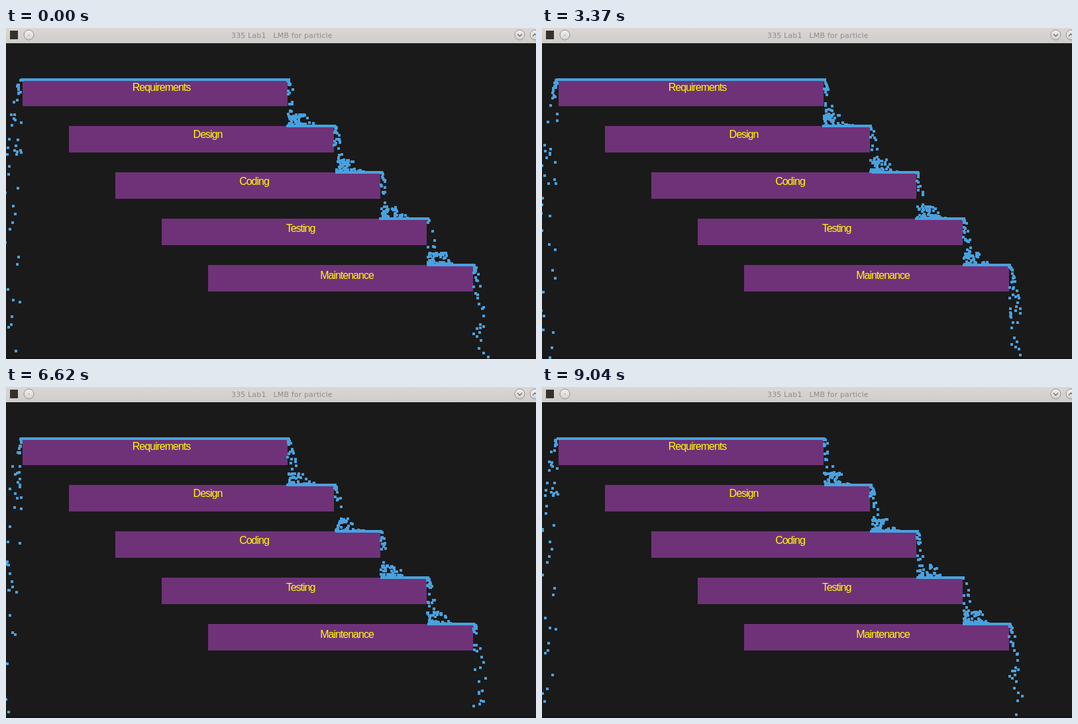
Animation of 800 by 500 pixels, one loop 9.14 s. Source, as an HTML page with a canvas:

```html
<!DOCTYPE html>
<html lang="en">
<head>
<meta charset="utf-8">
<title>Waterfall particles</title>
<style>
  html, body { margin: 0; width: 100%; height: 100%; overflow: hidden; background: #1a1a1a; }
  svg, canvas { position: absolute; left: 0; top: 0; width: 800px; height: 500px; }
  .title { font: 11px "DejaVu Sans", sans-serif; letter-spacing: .15px; fill: #8e8c8a; white-space: pre; }
  .label { font: 16px "Liberation Sans", Arial, sans-serif; letter-spacing: -1px; fill: #ff0; text-anchor: middle; }
  .box { fill: #6f3278; }
  .button { fill: url(#knob); stroke: #8f8d8a; }
  .arrow { fill: none; stroke: #6c6a68; stroke-width: 1.3; }
</style>
</head>
<body>
<svg viewBox="0 0 800 500">
  <defs>
    <linearGradient id="bar" x2="0" y2="1">
      <stop offset="0" stop-color="#dad7d5"/>
      <stop offset="1" stop-color="#cfccc9"/>
    </linearGradient>
    <linearGradient id="knob" x2="0" y2="1">
      <stop offset="0" stop-color="#f4f3f2"/>
      <stop offset="1" stop-color="#d3d0ce"/>
    </linearGradient>
  </defs>
  <rect width="800" height="500" fill="#1a1a1a"/>
  <rect y="497" width="800" height="3" fill="#161616"/>
  <rect width="800" height="23" fill="url(#bar)"/>
  <rect x="6" y="4" width="12" height="13" fill="#35322b"/>
  <circle class="button" cx="34.5" cy="10.5" r="7.5"/>
  <circle cx="34.5" cy="10.5" r="1" fill="#aaa8a6"/>
  <circle class="button" cx="775.5" cy="10.5" r="7.5"/>
  <path class="arrow" d="M772 9l3.5 3.5L779 9"/>
  <circle class="button" cx="798.5" cy="10.5" r="7.5"/>
  <path class="arrow" d="M795 12.5l3.5-3.5L802 12.5"/>
  <text class="title" x="340" y="15">335 Lab1&#160;&#160;&#160;LMB for particle</text>
  <g id="steps"></g>
</svg>
<canvas id="water" width="800" height="500"></canvas>
<script>
const LOOP = 9140, STEP = 53.5, FRAMES = 170;
const GRAVITY = 0.9, DROP = 70, MAX_SPEED = 1.36, PER_EDGE = 340;
const LABELS = ["Requirements", "Design", "Coding", "Testing", "Maintenance"];
const ctx = document.getElementById("water").getContext("2d");

const boxes = LABELS.map((text, i) => ({ text, x: 25 + 70 * i, y: 78 + 70 * i, w: 400, h: 40 }));

document.getElementById("steps").innerHTML = boxes.map((b, i) =>
  `<rect class="box" x="${b.x}" y="${b.y}" width="${b.w}" height="${b.h}"/>` +
  `<text class="label" x="${b.x + 209.5}" y="${95 + 71 * i}">${b.text}</text>`).join("");

let seed = 335;
function random() {
  seed = (seed * 1664525 + 1013904223) % 4294967296;
  return seed / 4294967296;
}

// Each edge sheds particles at random moments of the loop.
function makeEdge(x, y, dir, lands) {
  const drops = Array.from({ length: PER_EDGE }, () => ({
    born: random() * FRAMES,
    speed: dir * (0.02 + random() * MAX_SPEED),
    start: x + dir * random() * 1.4,
    bounce: 0.48 + random() * 0.04
  }));
  return { y, lands, drops };
}

const edges = [makeEdge(24, 78, -1, false)].concat(
  boxes.map((b, i) => makeEdge(b.x + b.w, b.y, 1, i < boxes.length - 1)));

const starts = Array.from({ length: FRAMES * boxes.length }, () => Math.floor(random() * 6) - 2);

// Distance fallen at a given age; null once the particle has settled.
function fallen(age, bounce, lands) {
  const d = GRAVITY * age * age / 2;
  if (!lands || d < DROP) return d;
  let v = Math.sqrt(2 * GRAVITY * DROP);
  age -= v / GRAVITY;
  for (let n = 0; n < 3; n++) {
    v *= bounce;
    const flight = 2 * v / GRAVITY;
    if (age < flight) return DROP - v * age + GRAVITY * age * age / 2;
    age -= flight;
  }
  return null;
}

function dot(x, y) {
  ctx.fillRect(Math.round(x) - 2, Math.round(y) - 2, 4, 4);
}

function draw(frame) {
  ctx.clearRect(0, 0, 800, 500);
  ctx.fillStyle = "#49a1de";
  boxes.forEach((b, i) => {
    const right = b.x + b.w + 2;
    const left = i ? b.x + 330 + starts[frame * boxes.length + i] : 22;
    ctx.fillRect(left, b.y - 2, right - left, 4);
  });
  for (const { y, lands, drops } of edges) {
    for (const p of drops) {
      const age = (frame - p.born + FRAMES) % FRAMES;
      if (age > 40) continue;
      const d = fallen(age, p.bounce, lands);
      if (d !== null) dot(p.start + p.speed * age, y + d);
    }
  }
}

const begin = performance.now();
let shown = -1;
function tick() {
  const time = (performance.now() - begin) % LOOP;
  const frame = Math.min(FRAMES - 1, Math.floor(time / STEP));
  if (frame !== shown) draw(shown = frame);
  requestAnimationFrame(tick);
}
tick();
</script>
</body>
</html>
```
